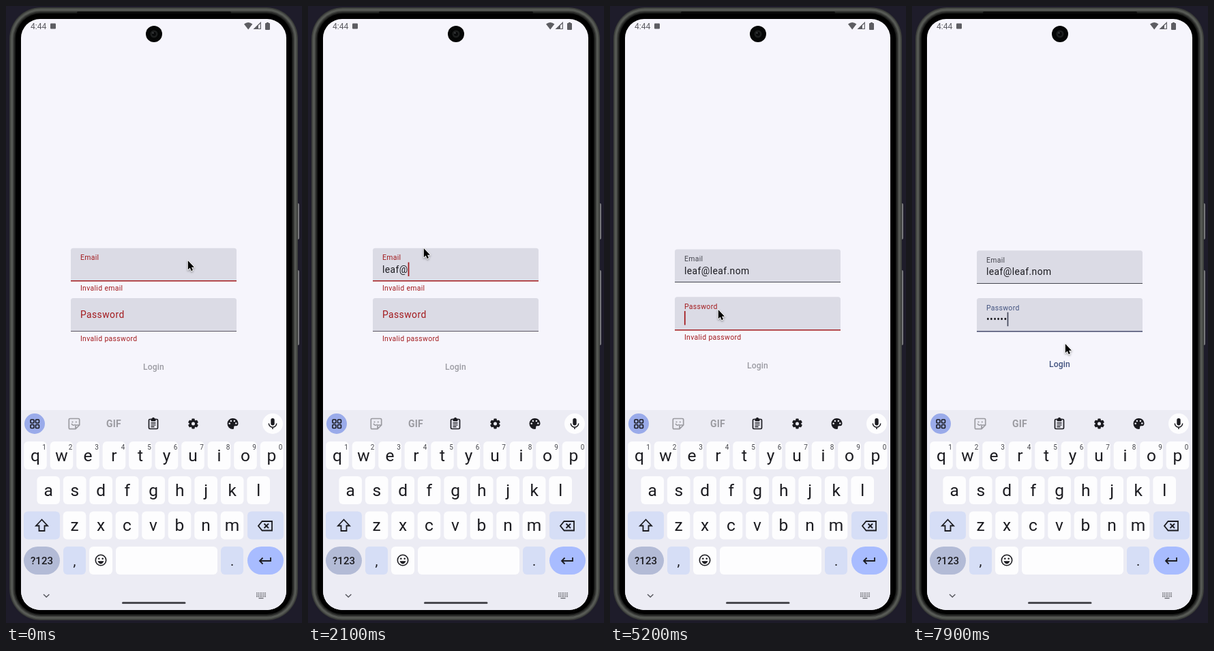
These frames come from a looping animation (434 by 904 pixels, 8 s). An HTML page with a canvas:

```html
<!DOCTYPE html>
<html lang="en">
<head>
<meta charset="utf-8">
<title>Login form</title>
<style>
  html, body { margin: 0; width: 100%; height: 100%; overflow: hidden; background: #1e1c2a; }
  canvas { display: block; width: 434px; height: 904px; }
</style>
</head>
<body>
<canvas id="stage" width="434" height="904"></canvas>
<script>
const ctx = document.getElementById('stage').getContext('2d');
const LOOP = 8000, STEP = 100;
const DP = 0.868;
const INK = '#1b1b20', RED = '#a31a1d', GREY = '#45464f', BLUE = '#41527f';
const SCREEN = [22, 19, 389, 866, 28];

const EMAIL = 'leaf@leaf.nom';
const EMAIL_KEYS = [600, 700, 900, 1000, 1900, 2200, 2400, 2600, 2700, 3000, 3200, 3400, 3500];
const PASSWORD_KEYS = [5900, 6100, 6300, 6500, 6700, 6900];
const EMAIL_VALID = 3200, PASSWORD_FOCUS = 5050, PASSWORD_VALID = 6900;

const MOVES = [
  { from: 100, to: 400, a: [266.5, 372], b: [169.5, 354] },
  { from: 4300, to: 4950, a: [169.5, 354], b: [158.5, 444] },
  { from: 5600, to: 5700, a: [158.5, 444], b: [157.5, 444] },
  { from: 6800, to: 7150, a: [157.5, 444], b: [224.5, 494] }
];

const clamp = v => Math.max(0, Math.min(1, v));
const lerp = (a, b, p) => a + (b - a) * p;
const ease = p => p * p * (3 - 2 * p);
const progress = (t, start, length = 150) => clamp((t - start) / length);

function mix(a, b, p) {
  const part = (c, i) => parseInt(c.slice(i, i + 2), 16);
  return `rgb(${[1, 3, 5].map(i => Math.round(lerp(part(a, i), part(b, i), p)))})`;
}

function box(x, y, w, h, r, fill, stroke, width = 1) {
  ctx.beginPath();
  ctx.roundRect(x, y, w, h, r);
  if (fill) { ctx.fillStyle = fill; ctx.fill(); }
  if (stroke) { ctx.strokeStyle = stroke; ctx.lineWidth = width; ctx.stroke(); }
}

function disc(x, y, r, fill) {
  ctx.beginPath();
  ctx.arc(x, y, r, 0, Math.PI * 2);
  ctx.fillStyle = fill;
  ctx.fill();
}

function line(d, color, width = 1.5) {
  ctx.strokeStyle = color;
  ctx.lineWidth = width;
  ctx.stroke(new Path2D(d));
}

function shape(d, color) {
  ctx.fillStyle = color;
  ctx.fill(new Path2D(d), 'evenodd');
}

function text(s, x, y, size, color, { align = 'left', weight = 400, spacing = 0 } = {}) {
  ctx.font = `${weight} ${size}px Roboto, sans-serif`;
  ctx.letterSpacing = spacing + 'px';
  ctx.textAlign = align;
  ctx.fillStyle = color;
  ctx.fillText(s, x, y);
  return ctx.measureText(s).width;
}

function at(x, y, draw) {
  ctx.save();
  ctx.translate(x, y);
  draw();
  ctx.restore();
}

function drawPhone() {
  ctx.fillStyle = '#1e1c2a';
  ctx.fillRect(0, 0, 434, 904);
  box(424, 289, 6, 53, 2, '#77777b');
  box(424, 387, 6, 110, 2, '#77777b');
  // The metal rim is a stack of insets that brightens, then falls to black.
  ['#3a3c39', '#4f524e', '#5a5d58', '#464845', '#2d2e2c', '#191a19', '#000000'].forEach((c, i) => {
    const inset = i * 1.5;
    box(5 + inset, 2 + inset, 423 - 2 * inset, 898 - 2 * inset, 46 - inset, c);
  });
  box(104, 8, 226, 3, 1.5, '#0b0b0b');
  box(...SCREEN, '#f6f5fc');
}

function drawStatus() {
  const c = '#5d5d62';
  text('4:44', 36, 34, 12.15, c);
  box(65, 25.5, 8, 8, 1, c);
  shape('M349 26.5 Q355.2 21.5 361.4 26.5 L355.2 34.5 Z', c);
  line('M364 33.5 L373.3 24.5 V33.5 Z', c, 1.2);
  shape('M363.5 34 L370 27.5 V34 Z', c);
  box(380, 25, 7, 10, 1, c);
  ctx.fillRect(382, 24, 3, 2);
  disc(217, 41, 12, '#050606');
  disc(217, 41, 5.5, '#1d1f1f');
  disc(217, 41, 3, '#090a0b');
  disc(215.5, 39.5, 1, '#55585a');
}

function gear(x, y) {
  at(x, y, () => {
    for (let i = 0; i < 3; i++) {
      box(-2.2, -7.5, 4.4, 15, 1, INK);
      ctx.rotate(Math.PI / 3);
    }
    disc(0, 0, 5.8, INK);
    disc(0, 0, 2.5, '#ececf4');
  });
}

function drawTools() {
  const pale = '#9b9ba1';
  at(100, 612, () => {
    line('M-6 -7.5 H6 Q7.7 -7.5 7.7 -6 V2 L2 7.7 H-6 Q-7.7 7.7 -7.7 6 V-6 Q-7.7 -7.5 -6 -7.5 M7.5 2 H3.5 Q2 2 2 3.5 V7.5', pale, 1.7);
    line('M-4 0 Q-1.5 4 2 1', pale);
    disc(-2.5, -2.5, 1.1, pale);
    disc(2.8, -2.5, 1.1, pale);
  });
  text('GIF', 158, 617, 14, pale, { align: 'center', weight: 700, spacing: 0.3 });
  at(216, 612, () => {
    box(-6.5, -6.5, 13, 14, 1.5, null, INK, 1.7);
    box(-3.5, -7.5, 7, 4, 1, INK);
    disc(0, -7.5, 1.8, INK);
    line('M-3.5 -1 H3.5 M-3.5 1.8 H3.5 M-3.5 4.5 H1.5', INK, 1.3);
  });
  gear(274.5, 612);
  at(332.5, 612, () => {
    shape('M0 -8 A8 8 0 1 0 0 8 Q2 8 1.7 5.5 Q1 3.5 3 3.3 H5 Q8 3 8 -0.5 C8 -5 4.5 -8 0 -8', INK);
    for (const [x, y] of [[-4.8, -0.2], [-2.6, -4], [2.4, -4], [4.8, -0.5]]) disc(x, y, 1.3, '#ececf4');
  });
}

function drawSuggestions(words, keycap) {
  ctx.fillStyle = '#cacad1';
  ctx.fillRect(159, 602, 1, 21);
  ctx.fillRect(271, 602, 1, 21);
  words.forEach((w, i) => text(w, 109.5 + i * 106, 618, 16, INK, { align: 'center' }));
  if (keycap) {
    box(314, 603.5, 17, 18, 1.5, '#7e90a8');
    [...'1234'].forEach((d, i) =>
      text(d, 318.5 + i % 2 * 8, 611.5 + (i >> 1) * 8.5, 8, '#ffffff', { align: 'center', weight: 500 }));
  }
}

function key(x, y, w, fill = '#fdfdfe', r = 6) {
  box(x, y, w, 41, r, fill);
}

function drawLetters(letters, x, y, hints) {
  [...letters].forEach((c, i) => {
    const cx = x + i * 38.5;
    key(cx - 16.8, y, 33.6);
    text(c, cx, y + 28.5, 24.5, INK, { align: 'center' });
    if (hints) text((i + 1) % 10, cx + 13, y + 11.5, 10, '#45464c', { align: 'center' });
  });
}

function drawKeyboard(t) {
  ctx.save();
  ctx.beginPath();
  ctx.roundRect(...SCREEN);
  ctx.clip();
  ctx.fillStyle = '#ececf4';
  ctx.fillRect(22, 592, 389, 293);
  ctx.restore();

  disc(42, 612, 15, '#9aabea');
  for (const x of [36, 43.5]) for (const y of [606, 613.5]) box(x, y, 5, 5, 1, null, INK, 1.6);
  disc(391, 612, 15, '#fdfdfe');
  box(388.3, 604, 5.4, 10.5, 2.7, INK);
  line('M385.3 611.5 A5.7 5.7 0 0 0 396.7 611.5 M391 617 V620', INK);

  if (t >= 600 && t < 1900) drawSuggestions(['lea', 'yes', 'LEA']);
  else if (t >= 5900 && t < PASSWORD_VALID) drawSuggestions([], t >= 6500);
  else drawTools();

  const tint = '#d6def6';
  drawLetters('qwertyuiop', 43, 638, true);
  drawLetters('asdfghjkl', 62.2, 689);
  drawLetters('zxcvbnm', 100.5, 740.5);
  key(26, 740.5, 53, tint);
  key(354, 740.5, 53, tint);
  line('M52.5 752.5 L44 761.5 H48.5 V769 H56.5 V761.5 H61 Z', INK, 1.8);
  line('M375.5 755 H390 V768.5 H375.5 L370 761.8 Z M378.5 758.5 L385 765 M385 758.5 L378.5 765', INK, 1.8);

  key(26, 792, 53, '#b3bbd6', 20.5);
  text('?123', 52.5, 817.5, 15, INK, { align: 'center', weight: 500 });
  key(84, 792, 33, tint);
  text(',', 100.5, 820, 20, INK, { align: 'center' });
  key(122, 792, 34);
  at(139, 812, () => {
    ctx.beginPath();
    ctx.arc(0, 0, 7.7, 0, Math.PI * 2);
    ctx.strokeStyle = INK;
    ctx.lineWidth = 1.6;
    ctx.stroke();
    disc(-2.7, -2.2, 1.3, INK);
    disc(2.7, -2.2, 1.3, INK);
    shape('M-4.5 1.3 H4.5 Q3 5.4 0 5.4 Q-3 5.4 -4.5 1.3', INK);
  });
  key(161, 792, 149);
  key(315, 792, 33, tint);
  text('.', 331.7, 820, 20, INK, { align: 'center' });
  key(354, 792, 53, '#a8bcff', 20.5);
  line('M388 808 V813 H372.5 M376.5 808.5 L372 813 L376.5 817.5', INK, 1.8);

  line('M55 862 L59.2 866 L63.4 862', '#55565c', 1.4);
  box(170, 873, 93.5, 3, 1.5, '#4a4a50');
  ctx.fillStyle = '#66676d';
  for (let i = 0; i < 6; i++) for (let j = 0; j < 3; j++) ctx.fillRect(367 + i * 2.5, 859.5 + j * 2.5, 1.5, 1.5);
  ctx.fillRect(370.5, 867, 7, 1.3);
}

function drawField({ top, label, raised, labelColor, value, caret, caretColor, lineColor, focused }) {
  const bottom = Math.round(top + 56 * DP);
  const lineWidth = focused ? 1.5 : 1;
  box(95, top, 243, bottom - top, [3.5, 3.5, 0, 0], '#dbdbe5');
  ctx.fillStyle = lineColor;
  ctx.fillRect(95, bottom - 1, 243, lineWidth);
  text(label, 108.9, top + lerp(28.7, 17.6, raised), lerp(16, 12, raised) * DP, labelColor,
    { spacing: lerp(0.5, 0.4, raised) * DP });
  const w = text(value, 108.9, top + 36, 16 * DP, INK, { spacing: 0.5 * DP });
  if (caret) {
    ctx.fillStyle = caretColor;
    ctx.fillRect(108.9 + w, top + 20.7, 2 * DP, 20.5);
  }
}

function drawSupport(s, top) {
  text(s, 108.9, top + 62.5, 12 * DP, RED, { spacing: 0.4 * DP });
}

// The caret restarts its half-second blink at focus and at each key press.
function blinkOn(t, marks) {
  const last = marks.filter(m => m <= t).pop();
  return last !== undefined && Math.floor((t - last) / 500) % 2 === 0;
}

const typed = (keys, t) => keys.filter(k => k <= t).length;

function drawForm(t) {
  const emailOk = t >= EMAIL_VALID, passwordOk = t >= PASSWORD_VALID;
  const onPassword = t >= PASSWORD_FOCUS;
  const shift = emailOk + passwordOk;
  const emailTop = 354.8 + shift * 1.75;
  const passwordTop = emailOk && !passwordOk ? 426.2 : 428;
  const emailFix = progress(t, EMAIL_VALID, 200);
  const passwordFix = progress(t, PASSWORD_VALID);

  drawField({
    top: emailTop, label: 'Email', raised: 1,
    labelColor: mix(RED, onPassword ? GREY : BLUE, emailFix),
    value: EMAIL.slice(0, typed(EMAIL_KEYS, t)),
    caret: !onPassword && blinkOn(t, [100, ...EMAIL_KEYS]),
    caretColor: emailOk ? BLUE : RED,
    lineColor: emailOk ? (onPassword ? GREY : '#474b6d') : RED,
    focused: !onPassword
  });
  if (!emailOk) drawSupport('Invalid email', emailTop);

  drawField({
    top: passwordTop, label: 'Password',
    raised: ease(progress(t, PASSWORD_FOCUS)),
    labelColor: mix(RED, BLUE, passwordFix),
    value: '•'.repeat(typed(PASSWORD_KEYS, t)),
    caret: onPassword && blinkOn(t, [PASSWORD_FOCUS, ...PASSWORD_KEYS]),
    caretColor: passwordOk ? '#474b5e' : RED,
    lineColor: passwordOk ? '#474b6d' : emailOk ? RED : '#5c5663',
    focused: onPassword
  });
  if (!passwordOk) drawSupport('Invalid password', passwordTop);

  text('Login', 216.4, 532.5 - shift * 1.75, 14 * DP, passwordOk ? BLUE : '#9b9ba2',
    { align: 'center', weight: 500, spacing: 0.1 * DP });
}

function drawPointer(t) {
  let [x, y] = MOVES[0].a;
  for (const { from, to, a, b } of MOVES) {
    if (t < from) break;
    const p = ease(progress(t, from, to - from));
    x = lerp(a[0], b[0], p);
    y = lerp(a[1], b[1], p);
  }
  at(x, y, () => {
    const arrow = 'M0 0 V15.5 L3.6 12.2 L6.1 17.6 L8.7 16.4 L6.3 11.2 H11.2 Z';
    ctx.translate(0.3, 1);
    ctx.scale(0.82, 0.86);
    ctx.lineJoin = 'round';
    ctx.shadowColor = 'rgba(0,0,0,.35)';
    ctx.shadowBlur = 3;
    ctx.shadowOffsetY = 1.5;
    line(arrow, '#ffffff', 2);
    ctx.shadowColor = 'transparent';
    shape(arrow, '#000000');
  });
}

function frame() {
  const t = Math.floor(performance.now() % LOOP / STEP) * STEP;
  drawPhone();
  drawStatus();
  drawForm(t);
  drawKeyboard(t);
  drawPointer(t);
  requestAnimationFrame(frame);
}
frame();
</script>
</body>
</html>
```
